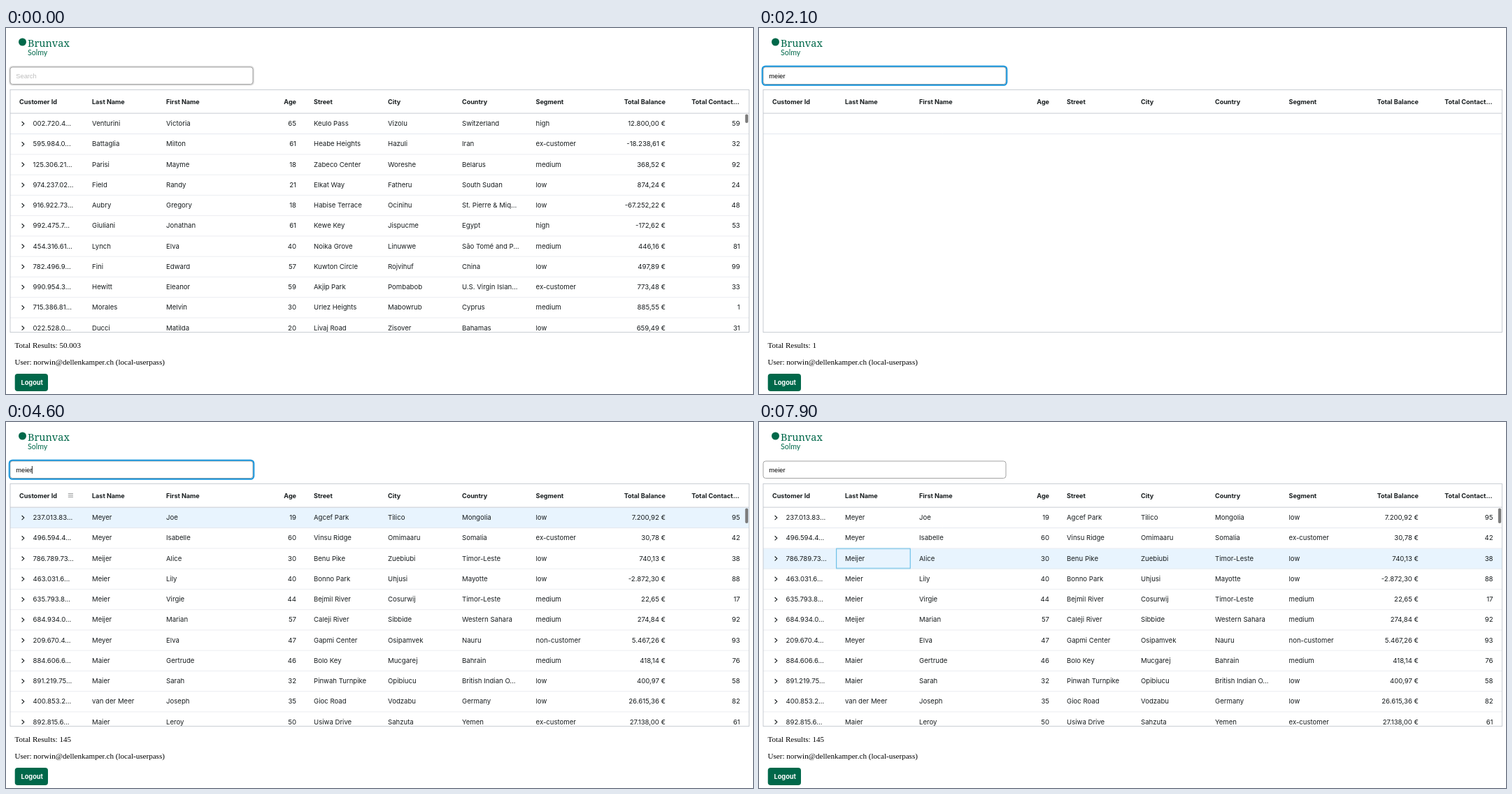
An HTML page that plays this animation: 1068x524 px, repeating every 8000 ms.

```html
<!DOCTYPE html>
<html lang="en">
<head>
<meta charset="utf-8">
<title>Customer search</title>
<style>
  html, body { margin: 0; width: 100%; height: 100%; overflow: hidden; background: #fff; }
  svg { display: block; width: 1068px; height: 524px; }
  text { font: 9.6px Inter, sans-serif; fill: #181d1f; white-space: pre; }
  .head { font-size: 9.05px; font-weight: 700; }
  .input { font: 9.28px "Liberation Sans", Arial, sans-serif; fill: #000; }
  .hint { fill: #bdbdbd; }
  .foot { font: 11.1px "Liberation Serif", Times, serif; fill: #000; }
  .button { font: 700 9.2px Inter, sans-serif; fill: #fff; }
  .brand { font: 14.5px "Noto Serif", serif; fill: #00684a; }
  .sub { font: 10.6px Lato, sans-serif; fill: #00684a; }
  .end { text-anchor: end; }
</style>
</head>
<body>
<script>
const LOOP = 8000, ROW = 29.25, TOP = 122.4;

const columns = [
  ['Customer Id', 19, 38.5], ['Last Name', 123], ['First Name', 229], ['Age', 415, 415, 'end'],
  ['Street', 440], ['City', 546], ['Country', 652], ['Segment', 757.5],
  ['Total Balance', 943, 943, 'end'], ['Total Contact...', 1048.5, 1049.5, 'end']
];

const allCustomers = `002.720.4...|Venturini|Victoria|65|Keulo Pass|Vizolu|Switzerland|high|12.800,00 €|59
595.984.0...|Battaglia|Milton|61|Heabe Heights|Hazuli|Iran|ex-customer|-18.238,61 €|32
125.306.21...|Parisi|Mayme|18|Zabeco Center|Woreshe|Belarus|medium|368,52 €|92
974.237.02...|Field|Randy|21|Elkat Way|Fatheru|South Sudan|low|874,24 €|24
916.922.73...|Aubry|Gregory|18|Habise Terrace|Ocinihu|St. Pierre & Miq...|low|-67.252,22 €|48
992.475.7...|Giuliani|Jonathan|61|Kewe Key|Jispucme|Egypt|high|-172,62 €|53
454.316.61...|Lynch|Elva|40|Noika Grove|Linuwwe|São Tomé and P...|medium|446,16 €|81
782.496.9...|Fini|Edward|57|Kuwton Circle|Rojvihuf|China|low|497,89 €|99
990.954.3...|Hewitt|Eleanor|59|Akjip Park|Pombabob|U.S. Virgin Islan...|ex-customer|773,48 €|33
715.386.81...|Morales|Melvin|30|Urlez Heights|Mabowrub|Cyprus|medium|885,55 €|1
022.528.0...|Ducci|Matilda|20|Livaj Road|Zisover|Bahamas|low|659,49 €|31`;

const foundCustomers = `237.013.83...|Meyer|Joe|19|Agcef Park|Tilico|Mongolia|low|7.200,92 €|95
496.594.4...|Meyer|Isabelle|60|Vinsu Ridge|Omimaaru|Somalia|ex-customer|30,78 €|42
786.789.73...|Meijer|Alice|30|Benu Pike|Zuebiubi|Timor-Leste|low|740,13 €|38
463.031.6...|Meier|Lily|40|Bonno Park|Uhjusi|Mayotte|low|-2.872,30 €|88
635.793.8...|Meier|Virgie|44|Bejmil River|Cosurwij|Timor-Leste|medium|22,65 €|17
684.934.0...|Meijer|Marian|57|Caleji River|Sibbide|Western Sahara|medium|274,84 €|92
209.670.4...|Meyer|Elva|47|Gapmi Center|Osipamvek|Nauru|non-customer|5.467,26 €|93
884.606.6...|Maier|Gertrude|46|Bolo Key|Mucgarej|Bahrain|medium|418,14 €|76
891.219.75...|Maier|Sarah|32|Pinwah Turnpike|Opibiucu|British Indian O...|low|400,97 €|58
400.853.2...|van der Meer|Joseph|35|Gioc Road|Vodzabu|Germany|low|26.615,36 €|82
892.815.6...|Maier|Leroy|50|Usiwa Drive|Sahzuta|Yemen|ex-customer|27.138,00 €|61`;

function add(parent, tag, attrs = {}, content = '') {
  const el = document.createElementNS('http://www.w3.org/2000/svg', tag);
  for (const key in attrs) el.setAttribute(key, attrs[key]);
  el.textContent = content;
  return parent.appendChild(el);
}
const label = (parent, x, y, content, cls = '') => add(parent, 'text', { x, y, class: cls }, content);
const box = (parent, x, y, width, height, attrs) => add(parent, 'rect', { x, y, width, height, ...attrs });
const line = (parent, y, stroke) => add(parent, 'path', { d: `M6 ${y}H1062`, stroke, 'stroke-width': .8 });

// Each step is [time in ms, value]; the first one must be at 0.
function play(el, property, steps, easing = 'step-end') {
  const frames = steps.map(([ms, value]) => ({ offset: ms / LOOP, [property]: value, easing }));
  frames.push({ offset: 1, [property]: steps.at(-1)[1] });
  el.animate(frames, { duration: LOOP, iterations: Infinity });
}
// Shows the element only within the given [from, to] spans.
function showDuring(el, ...spans) {
  const steps = spans.flatMap(([from, to]) => [[from, 1], [to, 0]]).filter(([ms]) => ms < LOOP);
  play(el, 'opacity', steps[0][0] ? [[0, 0], ...steps] : steps);
}

const svg = add(document.body, 'svg', { viewBox: '0 0 1068 524' });

// Brand
add(svg, 'circle', { cx: 23.5, cy: 20, r: 5.5, fill: '#00684a' });
label(svg, 31, 27, 'Brunvax', 'brand');
label(svg, 31, 38.5, 'Solmy', 'sub');

// Search field
const glow = box(svg, 5.2, 55.2, 348.6, 26.2, { rx: 4, fill: 'none', stroke: '#888', 'stroke-opacity': .3, 'stroke-width': 2 });
showDuring(glow, [0, 100]);
box(svg, 6, 56, 347, 24.5, { rx: 3.5, fill: '#fff', stroke: '#999', 'stroke-width': .9 });
const ring = box(svg, 4.7, 54.7, 349.6, 27.1, { rx: 4.5, fill: 'none', stroke: '#1594dc', 'stroke-width': 2 });
play(ring, 'opacity', [[0, 0], [100, .35], [200, .75], [300, 1], [5300, .4], [5400, 0]]);

showDuring(label(svg, 14.3, 72, 'Search', 'input hint'), [0, 1300]);
const typing = [[1300, 'm'], [1400, 'me'], [1500, 'mei'], [1600, 'meier']];
typing.forEach(([from, content], i) =>
  showDuring(label(svg, 14.3, 72, content, 'input'), [from, typing[i + 1]?.[0] ?? LOOP]));

const caret = box(svg, 14.2, 63, .9, 11, { fill: '#000' });
play(caret, 'transform', [[0, 0], [1300, 7.7], [1400, 12.9], [1500, 15], [1600, 22.8]]
  .map(([ms, x]) => [ms, `translateX(${x}px)`]));
showDuring(caret, [300, 800], [1300, 2100], [2800, 3100], [3600, 4100], [4600, 5100]);

// Grid
const clip = add(add(svg, 'defs'), 'clipPath', { id: 'body' });
box(clip, 6, 122, 1056, 313.3);
const grid = add(svg, 'g', { 'clip-path': 'url(#body)' });

const hover = box(grid, 6, TOP, 1056, ROW, { fill: '#e8f4fe' });
showDuring(hover, [4600, LOOP]);
play(hover, 'transform', [[0, 0], [6500, 1], [6600, 2]].map(([ms, row]) => [ms, `translateY(${row * ROW}px)`]));

line(grid, TOP + ROW, '#dde2eb');

function table(data, thumbHeight) {
  const group = add(grid, 'g');
  data.split('\n').forEach((row, i) => {
    const y = TOP + ROW * i;
    if (i) line(group, y + ROW, '#e6e9ee');
    add(group, 'path', {
      d: `M22.6 ${y + 11.6}l3.2 3.1l-3.2 3.1`, fill: 'none', stroke: '#181d1f', 'stroke-width': 1.1
    });
    row.split('|').forEach((value, c) => {
      const [, x, cellX = x, cls] = columns[c];
      label(group, cellX, y + 17.8, value, cls);
    });
  });
  box(group, 1056.8, 123.5, 4.3, thumbHeight, { rx: 2.1, fill: '#7d7d7d' });
  return group;
}
showDuring(table(allCustomers, 12.5), [0, 2100]);
play(table(foundCustomers, 21.5), 'opacity',
  [[0, 0], [2200, .1], [2300, .3], [2400, .6], [2500, .85], [2600, 1]]);

const cell = box(grid, 110.7, TOP + .4, 105.5, ROW - 1, { fill: 'none', stroke: '#45b0e0', 'stroke-width': .9 });
showDuring(cell, [5300, LOOP]);
play(cell, 'transform', [[0, 'translateY(0px)'], [7100, `translateY(${2 * ROW}px)`]]);

for (const [title, x, , cls = ''] of columns) label(svg, x, 108.6, title, 'head ' + cls);
const menu = add(svg, 'path', { d: 'M88.8 102.6h7.2m-7.2 2.4h7.2m-7.2 2.4h7.2', stroke: '#181d1f', 'stroke-width': .9 });
play(menu, 'opacity', [[0, 0], [4400, .5], [4500, 1], [4600, .5], [4700, 0]]);
line(svg, 122.1, '#babfc7');
box(svg, 6, 88.3, 1056.3, 347.4, { fill: 'none', stroke: '#babfc7', 'stroke-width': .8 });

// Footer
[['50.003', 0, 2100], ['1', 2100, 2800], ['145', 2800, LOOP]].forEach(([count, from, to]) =>
  showDuring(label(svg, 12.5, 457.5, 'Total Results: ' + count, 'foot'), [from, to]));
label(svg, 12.5, 481.5, 'User: norwin@dellenkamper.ch (local-userpass)', 'foot');
box(svg, 12.7, 495, 47.3, 25, { rx: 4, fill: '#00684a' });
label(svg, 21.5, 510.8, 'Logout', 'button');
</script>
</body>
</html>
```
